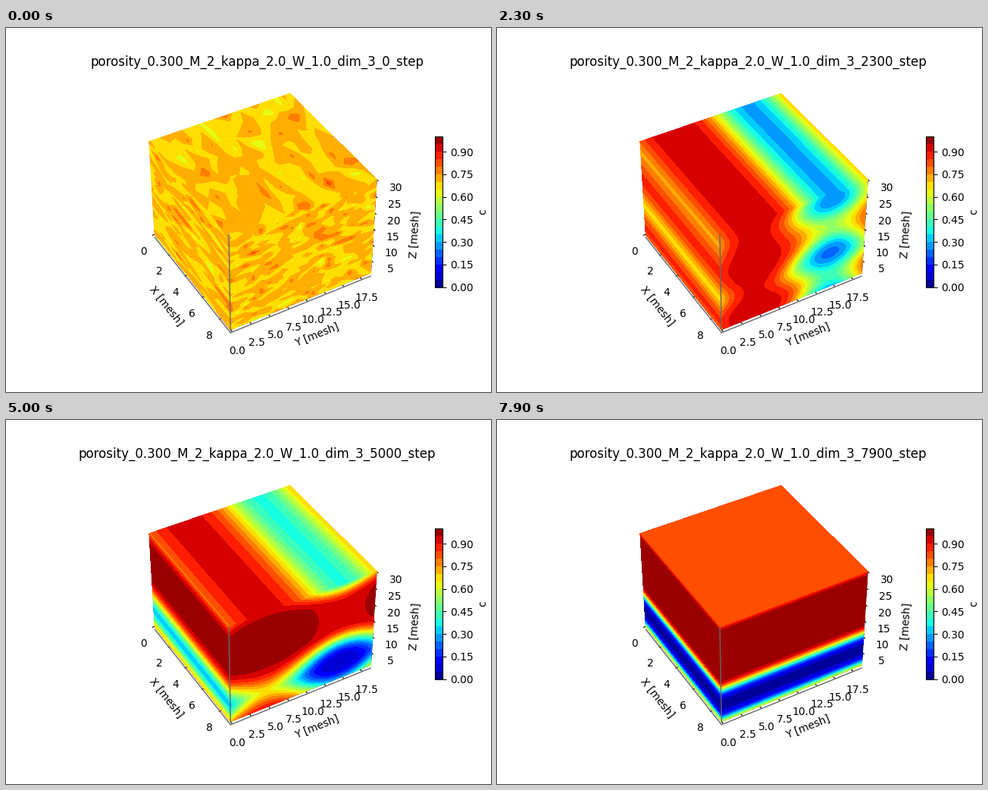
Write a matplotlib script that moves like this. It is 640 px wide and 480 px high and loops after 8 s.

```python
import numpy as np
import matplotlib.pyplot as plt
from matplotlib.animation import FuncAnimation

NX, NY, NZ = 10, 20, 30
FRAMES, STEP = 80, 100
X, Y, Z = np.meshgrid(np.arange(NX), np.arange(NY), np.arange(1, NZ + 1),
                      indexing="ij")
y, z = Y[0].astype(float), Z[0].astype(float)

# Initial noise and the squared wave numbers that damp it
noise = np.fft.fftn(np.random.default_rng(7).normal(0, 0.04, X.shape))
k2 = sum(k**2 for k in np.meshgrid(
    *(2 * np.pi * np.fft.fftfreq(n) for n in X.shape), indexing="ij"))


def wave(u, period):
    return np.cos(2 * np.pi * u / period)


A = wave(y - 14.6, NY)
B = wave(z - 6.2, NZ)
dist = np.abs((z - 6.2 + NZ / 2) % NZ - NZ / 2)


def two_drops():
    a = wave(y - 14.1, NY)
    q = (1 - a) / 2
    ripple = wave(z - 27.3 + 2.4 * q, NZ / 2)
    return 0.885 - 1.365 * a + (0.55 * q**3 - 0.9) * (1 + 0.45 * q * B) * ripple


def column():
    bend = 0.1 * (1 + A) * (B**2 - 1)
    return 1.27 - 2.0 * A - (0.36 + 0.24 * A) * B + bend


def drop():
    h = (1 - A) + 0.63 * (1 - B)
    return np.minimum(2.6 * h**0.8 - 2.6, 2.7)


def slab(base, tilt, slope, slope_tilt):
    g = base + tilt * A + (slope + slope_tilt * A) * dist**1.4
    return np.minimum(g, 4.5)


TIMES = [1600, 3200, 4300, 5700, 6800, 7900]
STATES = [two_drops(), column(), drop(),
          slab(-2.1, -1.4, 0.264, 0.027),
          slab(-3.85, -0.15, 0.411, 0),
          slab(-3.9, 0, 0.42, 0)]
REST = np.log(0.7 / 0.3)


def logit(t):
    """Logit of the concentration on the y-z plane."""
    if t <= TIMES[0]:
        grow = (1 + np.exp(-450 / 130)) / (1 + np.exp((1150 - t) / 130))
        return REST + grow * (STATES[0] - REST)
    j = min(np.searchsorted(TIMES, t, side="right"), len(TIMES) - 1) - 1
    w = (t - TIMES[j]) / (TIMES[j + 1] - TIMES[j])
    if j >= 3:  # relaxation towards the flat slab
        w = np.expm1(-1.9 * w) / np.expm1(-1.9)
    return (1 - w) * STATES[j] + w * STATES[j + 1]


def field(t):
    rough = np.fft.ifftn(noise * np.exp(-0.3 * t * k2**2)).real
    if t >= TIMES[0]:
        rough = 0 * rough
    return np.clip(1 / (1 + np.exp(-logit(t))) + rough, 0.001, 0.999)


fig = plt.figure(figsize=(6.4, 4.8), dpi=100)
ax = fig.add_subplot(111, projection="3d")
ax.set(xlim=(0, NX - 1), ylim=(0, NY - 1), zlim=(1, NZ),
       xlabel="X [mesh]", ylabel="Y [mesh]", zlabel="Z [mesh]")
ax.view_init(40, -30, 0)
ax.set_box_aspect(None, zoom=0.9)

edge = dict(color="0.4", linewidth=1, zorder=1e3)
ax.plot([NX - 1, NX - 1], [0, NY - 1], 0, **edge)
ax.plot([0, NX - 1], [0, 0], 0, **edge)
ax.plot([NX - 1, NX - 1], [0, 0], [1, NZ], **edge)

style = dict(vmin=0, vmax=1, levels=np.linspace(0, 1, 21), cmap="jet")
faces = []


def draw(i):
    while faces:
        faces.pop().remove()
    t = i * STEP
    c = field(t)
    faces.append(ax.contourf(X[:, :, -1], Y[:, :, -1], c[:, :, -1],
                             zdir="z", offset=NZ, **style))
    faces.append(ax.contourf(X[:, 0], c[:, 0], Z[:, 0],
                             zdir="y", offset=0, **style))
    faces.append(ax.contourf(c[-1], Y[-1], Z[-1],
                             zdir="x", offset=NX - 1, **style))
    ax.set_title(f"porosity_0.300_M_2_kappa_2.0_W_1.0_dim_3_{t}_step")
    return faces


draw(0)
fig.colorbar(faces[-1], ax=ax, fraction=0.02, pad=0.1, label="c")
anim = FuncAnimation(fig, draw, frames=FRAMES, interval=STEP, repeat=True,
                     repeat_delay=0, blit=False)
plt.show()
```
